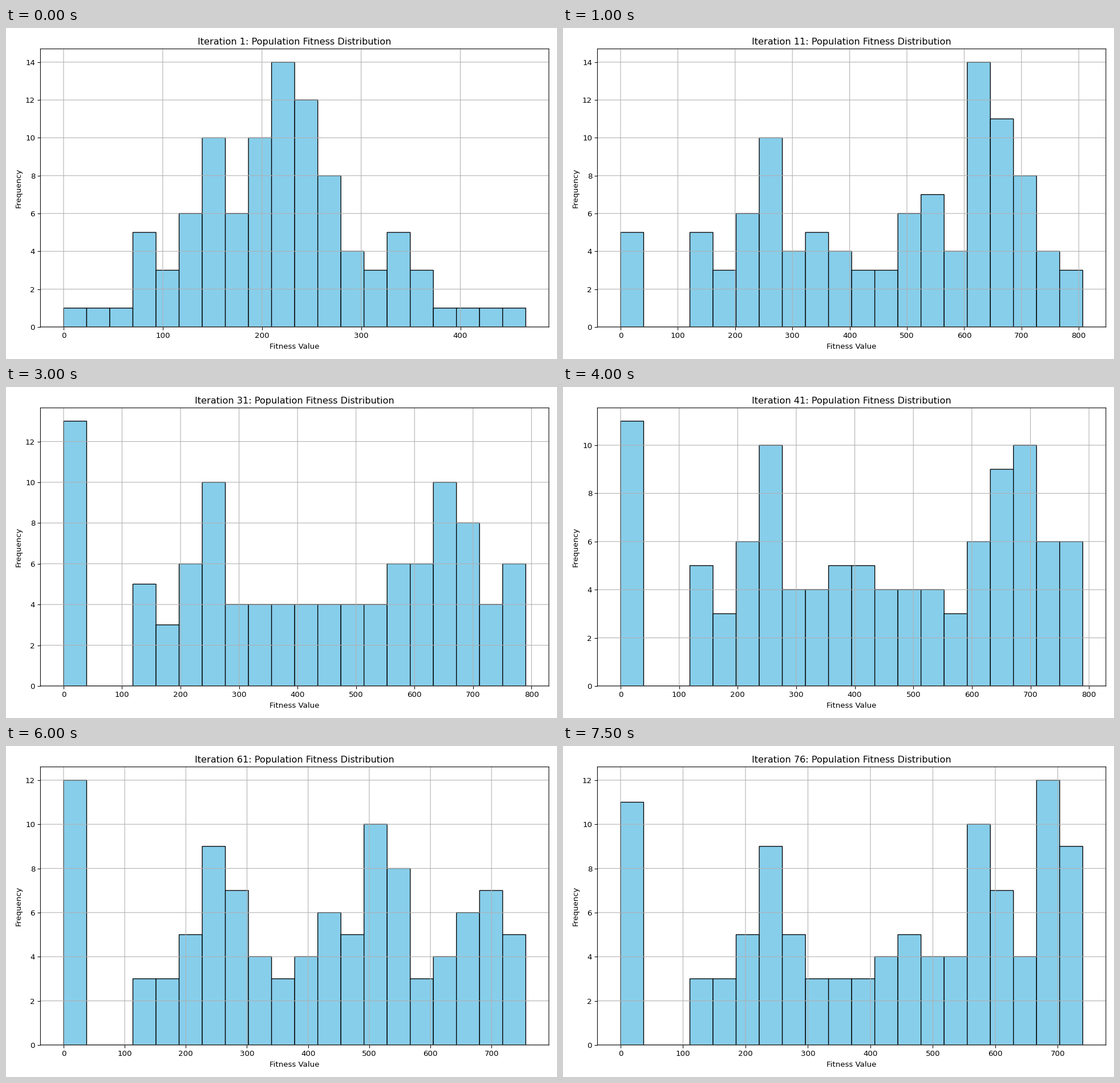
These frames come from a looping animation (966 by 580 pixels, 8 s). A matplotlib script:

```python
import matplotlib.pyplot as plt
import numpy as np
from matplotlib.animation import FuncAnimation

W, H, DPI = 966, 580, 96
STEPS, STEP_MS, BINS = 16, 500, 20

# Clusters of the population at key steps: (bar, height, slope per bar)
CLUSTERS = {
    0: [(9.3, 15, 4), (14, 5, 2)],
    2: [(8, 5, 1), (12.6, 8, 3), (15, 14, 12), (16, 11, 3.5)],
    4: [(14.3, 8.5, 2.7), (16, 12, 7), (19, 5, 2)],
    8: [(9.5, 4.7, 0.3), (16.6, 11, 3.3), (19, 6, 1)],
    10: [(8, 7, 4), (11, 6, 1), (17, 12, 8), (19, 7, 2)],
    12: [(7, 7, 3), (11, 6, 2), (13.3, 11.5, 5), (17.6, 7.6, 2)],
    15: [(7, 5, 2), (12, 5, 1), (15.3, 12, 6.5), (18.3, 14, 7.5)],
}
# Individuals without any fitness pile up in the first bar
SPIKE_STEPS = [0, 2, 4, 8, 9, 10, 11, 12, 13, 14, 15]
SPIKE = [1, 5, 15, 11, 11, 9, 12, 12, 13, 11, 11]
# Best fitness sets the width of the bars
BEST_STEPS = [0, 1, 2, 4, 9, 10, 11, 12, 15]
BEST = [466, 680, 807, 791, 789, 777, 792, 756, 740]


def profile(step):
    """Tallest cluster over each bar, on a flat floor."""
    bars = np.arange(BINS)
    tents = [top - slope * abs(bars - mid) for mid, top, slope in CLUSTERS[step]]
    return np.max(tents, axis=0).clip(1 if step == 0 else 3)


def counts_at(step):
    keys = list(CLUSTERS)
    rows = np.array([np.rint(profile(k)) for k in keys])
    counts = np.array([np.interp(step, keys, col) for col in rows.T])
    counts[0] = np.interp(step, SPIKE_STEPS, SPIKE)
    counts[1:3] = step == 0
    # The weak cluster hardly changes, it only shrinks late
    counts[3:7] = (5, 3, 6, 10) if step <= 10 else (3, 3, 5, 9)
    return np.rint(counts)


plt.rcParams.update({"font.family": "DejaVu Sans", "font.size": 10.06,
                     "path.snap": False})
fig = plt.figure(figsize=(W / DPI, H / DPI), dpi=DPI)
left, right, top, bottom = 60.4, 951.8, 36.6, 523.9
ax = fig.add_axes([left / W, 1 - bottom / H, (right - left) / W, (bottom - top) / H])


def draw(step):
    ax.clear()
    width = np.interp(step, BEST_STEPS, BEST) / BINS
    ax.bar(np.arange(BINS) * width, counts_at(step), width, align="edge",
           color="skyblue", edgecolor="black")
    ax.set_title(f"Iteration {5 * step + 1}: Population Fitness Distribution")
    ax.set_xlabel("Fitness Value", labelpad=4.6)
    ax.set_ylabel("Frequency")
    ax.grid(True)
    return ax.get_children()


anim = FuncAnimation(fig, draw, frames=STEPS, interval=STEP_MS,
                     repeat=True, repeat_delay=0, blit=False)
plt.show()
```
